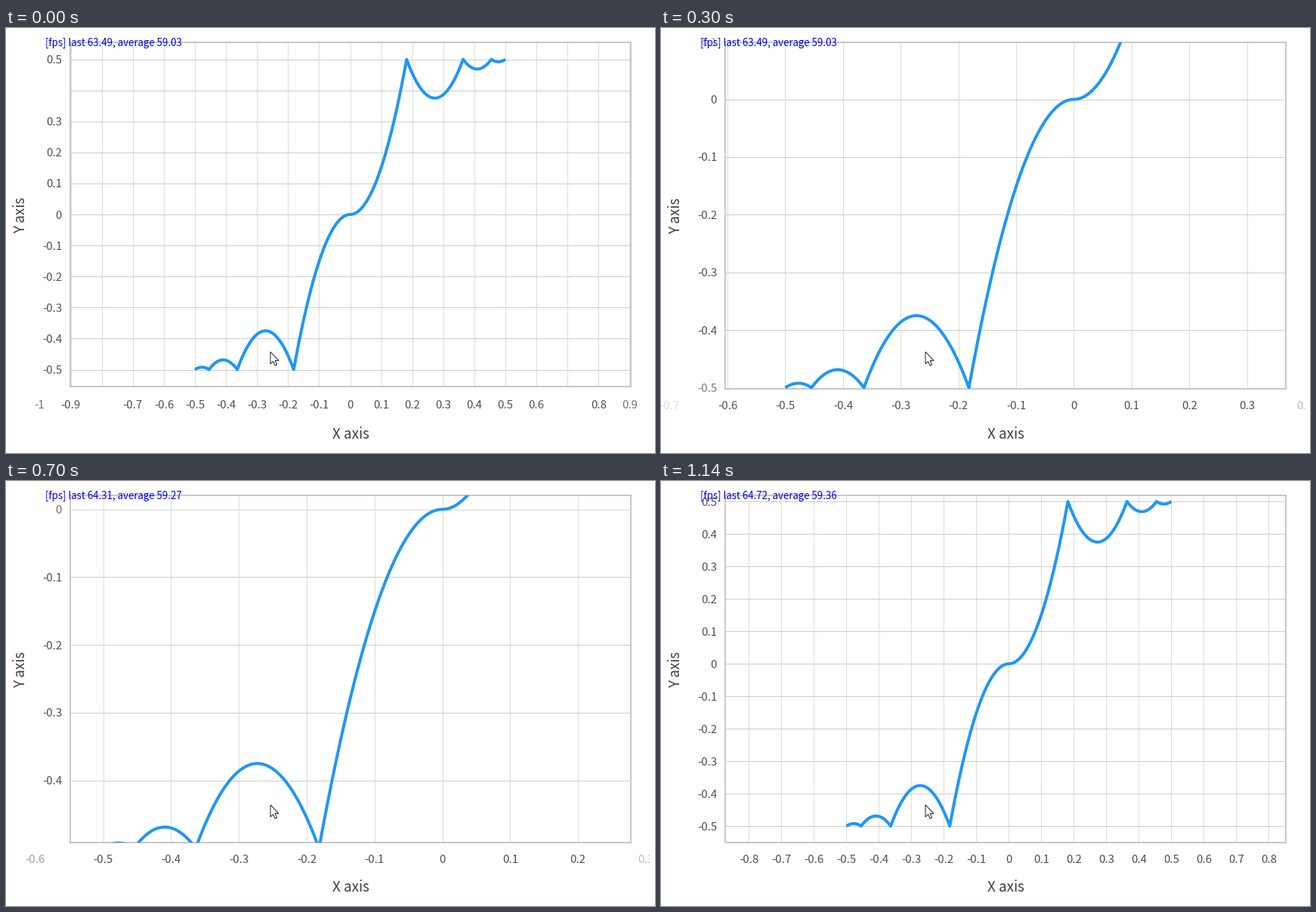
Recreate the animation shown at these times as a matplotlib script. Size 859x563 px, loop 1.16 s.

```python
import numpy as np
import matplotlib.pyplot as plt
from matplotlib.animation import FuncAnimation
from matplotlib.patches import Polygon, Rectangle

W, H = 859, 563
LOOP, TICK = 1160, 10
LEFT, TOP, RIGHT = 84.3, 18.5, 826
GREY, INK, TITLE = "#c8c8c8", "#505050", "#404040"

# Pixels per unit before, between and after the two zooms, and when they run
FAR, NEAR, BACK = 405.8, 995, 430
ZOOM_IN, ZOOM_OUT = (-37, 489), (591, 1090)
FADE = np.linspace(-45, 45, 16)

FPS = [(63.49, 59.03), (67.57, 59.18), (64.31, 59.27), (64.72, 59.36)]


def ease(t, start, end):
    u = np.clip((t - start) / (end - start), 0, 1)
    return u * u * (3 - 2 * u)


def view(t):
    """Scale and origin at time t: a zoom about a slowly drifting pivot."""
    s = FAR * (NEAR / FAR) ** ease(t, *ZOOM_IN) * (BACK / NEAR) ** ease(t, *ZOOM_OUT)
    pivot_x = 349.2 - 7 * np.exp(-((t - 820) / 140) ** 2)
    pivot_y = 425.1 + 0.003 * t
    return s, pivot_x + 0.2575 * s, pivot_y - 0.4345 * s


def bottom_at(t):
    return 475 + 4 * ease(t, 240, 330)


def share(inside):
    """Opacity of a tick: how much of the fade window it spends in view."""
    return float(np.mean(inside))


def second(ticks):
    return ticks[1:2]


def bounce_out(u):
    """Fall, then three rebounds of halving width."""
    start, width = -1, 2
    while u > (start + width) / 2.75:
        start, width = start + width, width / 2 if start >= 0 else 1
    mid = start + width / 2
    return 1 + 7.5625 * ((u - mid / 2.75) ** 2 - (width / 5.5) ** 2)


plt.rcParams["font.family"] = "Noto Sans CJK JP"
fig = plt.figure(figsize=((W + 0.01) / 72, (H + 0.01) / 72), dpi=72, facecolor="white")
ax = fig.add_axes([0, 0, 1, 1])
ax.set(xlim=(-0.5, W - 0.5), ylim=(H - 0.5, -0.5))
ax.axis("off")


def make_ticks(first, last, align, color):
    ticks = {}
    for k in range(first, last + 1):
        line, = ax.plot([], [], color=color, lw=1, zorder=1)
        label = ax.text(0, 0, f"{k / 10:g}", size=15, color=INK, ha=align,
                        va="baseline", zorder=5)
        ticks[k] = line, label
    return ticks


def show_tick(tick, ends, place, alpha, in_plot, labelled):
    line, label = tick
    line.set_data(*ends)
    label.set_position(place)
    for part in tick:
        part.set_alpha(alpha)
    line.set_visible(alpha > 0 and in_plot)
    label.set_visible(alpha > 0 and labelled)


x_ticks = make_ticks(-10, 9, "center", "#deded0")
y_ticks = make_ticks(-5, 5, "right", "#cecece")
frame = ax.add_patch(Rectangle((LEFT, TOP), 1, 1, fill=False, ec=GREY, lw=2, zorder=2))

xs = np.linspace(-0.5, 0.5, 1101)
ys = np.array([np.sign(x) * bounce_out(2 * abs(x)) / 2 for x in xs])
curve, = ax.plot([], [], color="#2196f3", lw=4, solid_capstyle="butt",
                 solid_joinstyle="round", zorder=3)

ax.text(455.5, 543, "X axis", size=18.8, color=TITLE, ha="center", va="baseline")
y_title = ax.text(25, 247, "Y axis", size=18.8, color=TITLE, rotation=90,
                  rotation_mode="anchor", ha="center", va="baseline")
fps = ax.text(51.5, 23, "", size=13.25, color="#0000ff", va="baseline", zorder=7)

arrow = [(0, 0), (0, 16), (3.6, 12.6), (6, 18.2), (8.6, 17), (6.2, 11.6), (11, 11.6)]
ax.add_patch(Polygon(np.array(arrow) + (349.5, 428.5), fc="white", ec="#202030",
                     lw=1, zorder=6))
# Labels are cut off at the right border
ax.add_patch(Rectangle((851.5, -1), 10, H + 2, fc="white", ec="none", zorder=8))


def draw(i):
    t = i * TICK
    s, x0, y0 = view(t)
    near_s, near_x0, near_y0 = view(t + FADE)
    bottom = bottom_at(t)
    shift = (bottom - 475) / 2
    frame.set_bounds(LEFT, TOP, RIGHT - LEFT, bottom - TOP)
    y_title.set_y(247 + shift)

    x_at = {k: x0 + k * s / 10 for k in x_ticks}
    y_at = {k: y0 - k * s / 10 for k in y_ticks}

    # While zooming in, the labels next to the outermost ones drop out
    no_x, no_y = [], []
    if t < 260:
        seen = [k for k in x_at if LEFT < x_at[k] < RIGHT - 5]
        no_x = second(seen) + second(seen[::-1])
        no_y = second([k for k in y_at if y_at[k] > TOP][::-1])

    for k, x in x_at.items():
        path = near_x0 + k * near_s / 10
        alpha = share((path > 36) & (path < RIGHT + 12))
        if abs(k) > 8 and t > ZOOM_IN[1]:
            alpha = 0
        show_tick(x_ticks[k], ([x, x], [TOP, bottom]), (x, 503 + shift), alpha,
                  LEFT < x < RIGHT, k not in no_x)

    for k, y in y_at.items():
        path = near_y0 - k * near_s / 10
        alpha = share((path > TOP) & (path < bottom_at(t + FADE)))
        show_tick(y_ticks[k], ([LEFT, RIGHT], [y, y]), (73.5, y + 5.5), alpha,
                  TOP < y < bottom, k not in no_y)

    curve.set_data(x0 + xs * s, y0 - ys * s)
    curve.set_clip_path(frame)

    last, mean = FPS[t // 310]
    fps.set_text(f"[fps] last {last:.2f}, average {mean:.2f}")
    return []


anim = FuncAnimation(fig, draw, frames=LOOP // TICK, interval=TICK,
                     init_func=lambda: [], repeat=True, repeat_delay=0)
plt.show()
```
